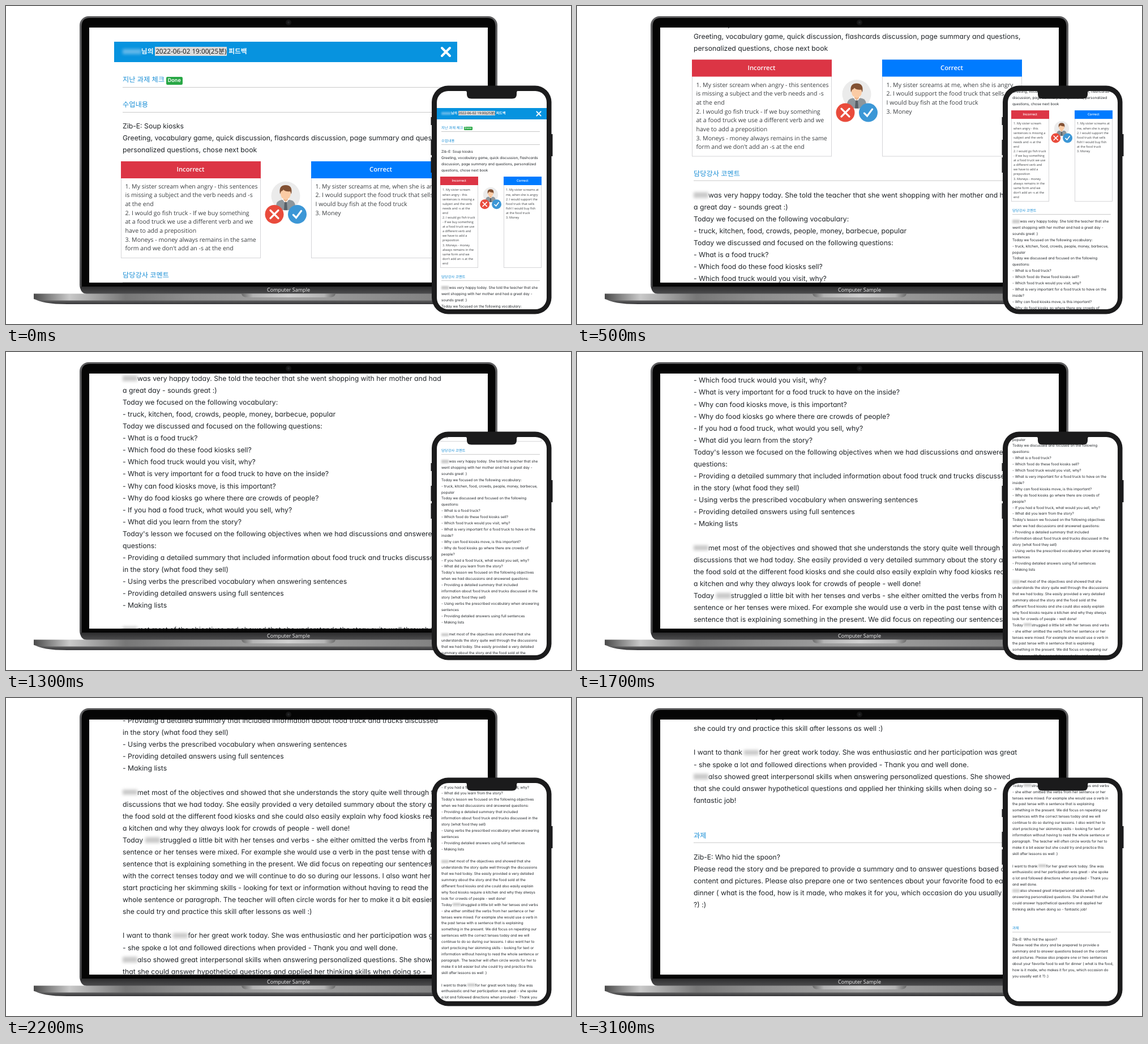
These frames come from a looping animation (998x561 px, 4.1 s). An HTML page:

```html
<!DOCTYPE html>
<html lang="ko">
<head>
<meta charset="utf-8">
<title>Lesson feedback on two devices</title>
<style>
  html, body { margin: 0; width: 100%; height: 100%; overflow: hidden; background: #fff; }
  #stage { position: relative; width: 998px; height: 561px; overflow: hidden; }
  #stage > svg { position: absolute; left: 0; top: 0; }
  .screen { position: absolute; overflow: hidden; background: #fff; }
  #laptop { left: 147px; top: 38px; width: 704px; height: 450px; font-size: 12.23px; }
  #phone { left: 761px; top: 150px; width: 194px; height: 385px; border-radius: 20px; font-size: 6.33px; }
  .page {
    position: absolute; color: #212529; text-rendering: geometricPrecision;
    font-family: Inter, "Noto Sans CJK KR", "Noto Sans CJK", sans-serif; font-feature-settings: "cv11";
  }
  .page > * { position: absolute; white-space: pre; }
  .bar { background: #0793df; }
  .title { color: #fff; font-size: .96em; font-weight: 600; }
  .title b { font: 400 1em "Open Sans", "Noto Sans CJK KR", sans-serif; background: #dcdcdc; color: #111; padding: 0 .06em; }
  .head { color: #1b8fd6; font-weight: 500; }
  .head b {
    display: inline-block; margin-left: .3em; padding: 0 .35em; border-radius: .25em;
    background: #28a745; color: #fff; font-size: .74em; line-height: 1.45em; font-weight: 600;
  }
  .rule { height: 1px; background: #c9c9c9; }
  .cell { box-sizing: border-box; border: 1px solid #d5d5d8; }
  .label { color: #fff; text-align: center; }
  .label, .note { font-family: "Open Sans", "Noto Sans", sans-serif; }
  .label { font-size: .92em; font-weight: 600; }
  .note { color: #3c3f42; font-size: .865em; }
  i { display: inline-block; width: 2.13em; height: .8em; vertical-align: -.08em; background: #c9c9c9; filter: blur(.22em); }
  .title i { width: 2.8em; background: #63b8ea; }
</style>
</head>
<body>
<div id="stage">
  <svg width="998" height="561">
    <defs>
      <linearGradient id="lid" x2="0" y2="1">
        <stop stop-color="#5c5c5e"/><stop offset=".5" stop-color="#7d7d80"/><stop offset="1" stop-color="#4a4a4c"/>
      </linearGradient>
      <linearGradient id="chin" x2="0" y2="1"><stop stop-color="#2c2c2d"/><stop offset="1" stop-color="#4d4d4f"/></linearGradient>
      <linearGradient id="deck">
        <stop stop-color="#4a4a4a"/><stop offset=".035" stop-color="#8c8c8c"/><stop offset=".07" stop-color="#c9c9c9"/>
        <stop offset=".18" stop-color="#777"/><stop offset=".3" stop-color="#8e8e8e"/><stop offset=".5" stop-color="#a2a2a2"/>
        <stop offset=".8" stop-color="#808080"/><stop offset="1" stop-color="#555"/>
      </linearGradient>
      <linearGradient id="under" x2="0" y2="1"><stop stop-color="#777"/><stop offset="1" stop-color="#363638"/></linearGradient>
      <linearGradient id="lip">
        <stop stop-color="#6a6a6a"/><stop offset=".12" stop-color="#b4b4b4"/><stop offset=".5" stop-color="#cfcfcf"/>
        <stop offset=".88" stop-color="#b4b4b4"/><stop offset="1" stop-color="#6a6a6a"/>
      </linearGradient>
    </defs>
    <rect x="130" y="18" width="738" height="490" rx="16" fill="url(#lid)"/>
    <path d="M133.500 495V36Q133.500 21 148 21H850Q864.500 21 864.500 36V495Z" fill="#050505"/>
    <path d="M131 495H867Q866 508 854 508H144Q132 508 131 495Z" fill="url(#chin)"/>
    <circle cx="499" cy="29" r="5" fill="#161616"/><circle cx="499" cy="29" r="2" fill="#26282c"/>
    <text x="499" y="504.3" text-anchor="middle" fill="#f4f4f4" font-size="9" font-family="Open Sans, sans-serif">Computer Sample</text>
    <path d="M49 516H949Q935 526 890 526H108Q63 526 49 516Z" fill="url(#under)"/>
    <path d="M49 507.500H949V517Q940 519.500 920 519.500H78Q58 519.500 49 517Z" fill="url(#deck)"/>
    <path d="M416 507.500H582Q581 514 571 514H427Q417 514 416 507.500Z" fill="url(#lip)"/>
  </svg>
  <div class="screen" id="laptop"></div>
  <svg width="998" height="561" fill="#1b1b1c">
    <path d="M750.500 196h3v14h-3zM750.500 236h3v27h-3zM750.500 267h3v27h-3zM962 226h3.500v39H962z"/>
    <rect x="752" y="140.500" width="211.500" height="403" rx="29"/>
  </svg>
  <div class="screen" id="phone"></div>
  <svg width="998" height="561">
    <path d="M811 149H905Q902 150 902 153V156Q902 163.500 894 163.500H822Q814 163.500 814 156V153Q814 150 811 149Z" fill="#1b1b1c"/>
  </svg>
</div>
<script>
// "|" breaks a line on the laptop only, "~" on the phone only, "*" is a blurred name.
const intro = `Zib-E: Soup kiosks
Greeting, vocabulary game, quick discussion, flashcards~discussion, page summary and questions,|personalized~questions, chose next book`;

const wrong = `1. My sister scream~when angry - this~sentences|is missing a~subject and the verb~needs and -s|at the~end
2. I would go fish truck~- If we buy something
at a food truck we use~a different verb and~we|have to add a~preposition
3. Moneys - money~always remains in the~same|form and we~don't add an -s at the~end`;

const right = `1. My sister screams at~me, when she is angry
2. I would support the~food truck that sells~fish!|I would buy fish~at the food truck
3. Money`;

const comment = `*was very happy today. She told the teacher that she~went shopping with her mother and had|a great day -~sounds great :)
Today we focused on the following vocabulary:
- truck, kitchen, food, crowds, people, money, barbecue,~popular
Today we discussed and focused on the following~questions:
- What is a food truck?
- Which food do these food kiosks sell?
- Which food truck would you visit, why?
- What is very important for a food truck to have on the~inside?
- Why can food kiosks move, is this important?
- Why do food kiosks go where there are crowds of~people?
- If you had a food truck, what would you sell, why?
- What did you learn from the story?
Today's lesson we focused on the following objectives~when we had discussions and answered|questions:
- Providing a detailed summary that included~information about food truck and trucks discussed|in the~story (what food they sell)
- Using verbs the prescribed vocabulary when answering~sentences
- Providing detailed answers using full sentences
- Making lists

*met most of the objectives and showed that she~understands the story quite well through the|discussions~that we had today. She easily provided a very detailed~summary about the story and|the food sold at the~different food kiosks and she could also easily explain~why food kiosks require|a kitchen and why they always~look for crowds of people - well done!
Today *struggled a little bit with her tenses and verbs~- she either omitted the verbs from her|sentence or her~tenses were mixed. For example she would use a verb in~the past tense with a|sentence that is explaining~something in the present. We did focus on repeating our~sentences|with the correct tenses today and we will~continue to do so during our lessons. I also want her to
start practicing her skimming skills - looking for text or~information without having to read the|whole sentence or~paragraph. The teacher will often circle words for her to~make it a bit easier but|she could try and practice this~skill after lessons as well :)

I want to thank *for her great work today. She was~enthusiastic and her participation was great|- she spoke~a lot and followed directions when provided - Thank you~and well done.
*also showed great interpersonal skills when~answering personalized questions. She showed|that she~could answer hypothetical questions and applied her~thinking skills when doing so -|fantastic job!`;

const homework = `Zib-E: Who hid the spoon?
Please read the story and be prepared to provide a~summary and to answer questions based on the|content~and pictures. Please also prepare one or two sentences~about your favorite food to eat for|dinner ( what is the food,~how is it made, who makes it for you, which occasion do~you usually eat it|?) :)`;

const headings = ['지난 과제 체크<b>Done</b>', '수업내용', '담당강사 코멘트', '과제'];

const cross = width => `<path d="M-7-7L7 7M7-7L-7 7" stroke="#fff" stroke-width="${width}" stroke-linecap="round"/>`;
const avatar = `<circle r="25.500" fill="#ebebeb"/>
  <path d="M-17 19Q-17 8-7 7H7Q17 8 17 19Q10 25.500 0 25.500T-17 19Z" fill="#8d969c"/>
  <path d="M-6 6L0 14L6 6V2H-6Z" fill="#fff"/><path d="M-2 11H2L3 25H-3Z" fill="#586067"/>
  <path d="M-4 1H4V7L0 11L-4 7Z" fill="#eeb68c"/>
  <ellipse cy="-4" rx="9" ry="10.500" fill="#fbcba4"/>
  <path d="M-10-3Q-13-19 0-19T10-3L8-8Q0-7-4-11Q-6-8-8-8Z" fill="#825133"/>
  <g transform="translate(-20 32.500)"><circle r="16.500" fill="#e94b3c"/>${cross(3.2)}</g>
  <g transform="translate(20.500 32.500)"><circle r="16.500" fill="#3c97d6"/>
    <path d="M-7 1L-2 6L7-6" fill="none" stroke="#fff" stroke-width="3.200" stroke-linecap="round"/></g>`;

const devices = [
  {
    id: 'laptop', step: 35.88, breakMark: '|', joinMark: '~', scale: 1, left: 206, right: 785,
    bar: [191, 63, 606, 36], closeX: 777, heads: [130, 174, 474.5, 1354.3], ruleGap: 13,
    texts: [211.5, 512.4, 1392.3], pitch: 21.08,
    cells: [202.5, 538.5], cellTop: 274, cellSize: [247, 170.5], labelHeight: 29.5,
    noteY: 319.5, notePitch: 15.68, notePad: 8, avatar: [493.5, 335]
  },
  {
    id: 'phone', step: 23.37, breakMark: '~', joinMark: '|', scale: .515, left: 769, right: 943,
    bar: [761, 180, 194, 19.5], closeX: 940.5, heads: [215, 238, 478, 1130.5], ruleGap: 6.5,
    texts: [257.5, 497.5, 1150], pitch: 10.9,
    cells: [767, 879], cellTop: 301, cellSize: [66.5, 161], labelHeight: 15,
    noteY: 324.5, notePitch: 8.09, notePad: 4, avatar: [856, 332.5]
  }
];

function buildPage(d) {
  const screen = document.getElementById(d.id);
  const page = document.createElement('div');
  page.className = 'page';
  page.style.left = -screen.offsetLeft + 'px';
  page.style.top = -screen.offsetTop + 'px';

  const add = html => page.insertAdjacentHTML('beforeend', html);
  const box = (cls, x, y, w, h, style = '', html = '') =>
    add(`<div class="${cls}" style="left:${x}px;top:${y}px;width:${w}px;height:${h}px;${style}">${html}</div>`);
  // y is the middle of the first line
  const text = (cls, x, y, pitch, content) => {
    const html = content.replaceAll(d.breakMark, '\n').replaceAll(d.joinMark, ' ').replaceAll('*', '<i></i>');
    add(`<div class="${cls}" style="left:${x}px;top:${y - pitch / 2}px;line-height:${pitch}px">${html}</div>`);
  };
  const icon = (x, y, shapes) =>
    add(`<svg style="left:${x}px;top:${y}px;overflow:visible" width="1" height="1"><g transform="scale(${d.scale})">${shapes}</g></svg>`);

  const barMiddle = d.bar[1] + d.bar[3] / 2;
  box('bar', ...d.bar);
  text('title', d.left, barMiddle, d.pitch, '*님의 <b>2022-06-02 19:00(25분)</b> 피드백');
  icon(d.closeX, barMiddle, cross(4));

  headings.forEach((heading, i) => {
    text('head', d.left, d.heads[i], d.pitch, heading);
    box('rule', d.left, d.heads[i] + d.ruleGap - .5, d.right - d.left, 1);
  });
  [intro, comment, homework].forEach((body, i) => text('body', d.left, d.texts[i], d.pitch, body));

  [['Incorrect', '#dc3545', wrong], ['Correct', '#007bff', right]].forEach(([label, color, note], i) => {
    const x = d.cells[i], [w, h] = d.cellSize;
    box('cell', x, d.cellTop, w, h);
    box('label', x, d.cellTop, w, d.labelHeight, `background:${color};line-height:${d.labelHeight}px`, label);
    text('note', x + d.notePad, d.noteY, d.notePitch, note);
  });
  icon(...d.avatar, avatar);

  screen.append(page);
  d.page = page;
}

devices.forEach(buildPage);

const LOOP = 4100, TICK = 100, LAST_TICK = 31;

function draw() {
  const tick = Math.min(Math.floor(performance.now() % LOOP / TICK), LAST_TICK);
  for (const d of devices) d.page.style.transform = `translateY(${-tick * d.step}px)`;
  requestAnimationFrame(draw);
}
draw();
</script>
</body>
</html>
```
